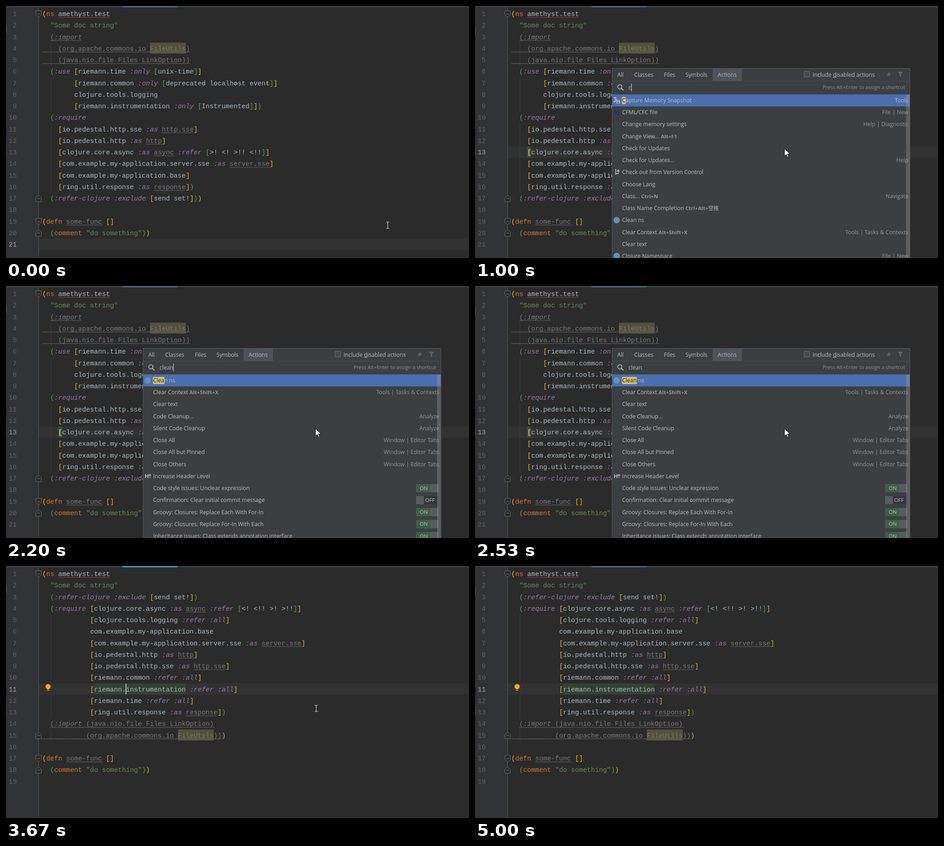
Animation, 1015 px wide and 552 px high, one loop 5.07 s. Source, as an HTML page:

```html
<!DOCTYPE html>
<html lang="en">
<head>
<meta charset="utf-8">
<title>Clean namespace</title>
<style>
html, body { margin: 0; width: 100%; height: 100%; overflow: hidden; background: #2b2b2b; }
svg { display: block; }
.code text { font: 14.564px "Liberation Mono", monospace; }
.code .kw { font-style: italic; }
.code .bold { font-weight: bold; }
.ui text { font: 12.2px "Open Sans", "Noto Sans CJK SC", sans-serif; fill: #bbb; }
.ui .key { font-size: 11.4px; font-weight: bold; fill: #929496; }
.ui .dim { fill: #929496; }
.ui .hint { font-size: 11px; fill: #8c8e90; }
.ui .small { font-size: 11.5px; }
.ui .strong { font-weight: bold; }
.ui .hit { fill: #262626; }
</style>
</head>
<body>
<svg id="stage" width="1015" height="552" viewBox="0 0 1015 552"></svg>
<script>
const LOOP = 5070, X0 = 79.5, CW = 8.74, LH = 25.26;
const GREY = '#76777c', YELLOW = '#e8ba36', GREEN = '#54a857';
const stage = document.getElementById('stage');
const $ = id => document.getElementById(id);
const esc = s => s.replace(/&/g, '&amp;').replace(/</g, '&lt;').replace(/>/g, '&gt;');
const colX = c => X0 + c * CW;
const rowY = i => 4.6 + LH * i;
const baseY = i => 22 + LH * i;
const rect = (x, y, w, h, fill, more = '') =>
  `<rect x="${x}" y="${y}" width="${w}" height="${h}" fill="${fill}" ${more}/>`;
const text = (x, y, s, more = '') => `<text x="${x}" y="${y}" ${more}>${s}</text>`;
const line = (d, stroke, more = '') => `<path d="${d}" fill="none" stroke="${stroke}" ${more}/>`;

const before = `(ns amethyst.test
  "Some doc string"
  (:import
    (org.apache.commons.io FileUtils)
    (java.nio.file Files LinkOption))
  (:use [riemann.time :only [unix-time]]
        [riemann.common :only [deprecated localhost event]]
        clojure.tools.logging
        [riemann.instrumentation :only [Instrumented]])
  (:require
    [io.pedestal.http.sse :as http.sse]
    [io.pedestal.http :as http]
    [clojure.core.async :as async :refer [>! <! >!! <!!]]
    [com.example.my-application.server.sse :as server.sse]
    [com.example.my-application.base]
    [ring.util.response :as response])
  (:refer-clojure :exclude [send set!]))

(defn some-func []
  (comment "do something"))
`;
const after = `(ns amethyst.test
  "Some doc string"
  (:refer-clojure :exclude [send set!])
  (:require [clojure.core.async :as async :refer [<! <!! >! >!!]]
            [clojure.tools.logging :refer :all]
            com.example.my-application.base
            [com.example.my-application.server.sse :as server.sse]
            [io.pedestal.http :as http]
            [io.pedestal.http.sse :as http.sse]
            [riemann.common :refer :all]
            [riemann.instrumentation :refer :all]
            [riemann.time :refer :all]
            [ring.util.response :as response])
  (:import (java.nio.file Files LinkOption)
           (org.apache.commons.io FileUtils)))

(defn some-func []
  (comment "do something"))
`;

function wave(c1, c2, row, color) {
  const n = Math.round((c2 - c1) * CW / 4);
  return line(`M${colX(c1)} ${baseY(row) + 4}` + 'l2 -2l2 2'.repeat(n), color, 'stroke-width=".9"');
}

// Colours one file; with inspect off the checks (unused, aliases) are not shown yet.
function code(src, inspect) {
  const depth = { '(': 0, '[': 0 };
  let out = '', unused = 0, prev = '';
  src.split('\n').forEach((s, row) => {
    let from = unused ? 0 : -1, to = 0;
    for (const m of s.matchAll(/"[^"]*"|:[\w-]+|[()[\]]|[^\s()[\]":]+/g)) {
      const w = m[0], c = m.index;
      let fill = '#a9b7c6', cls = '';
      if (w === '(' && s.startsWith(':import', c + 1)) {
        unused = depth['('] + 1;
        from = c;
      }
      const inside = unused;
      if (w === '(' || w === '[') fill = ++depth[w] % 2 ? YELLOW : GREEN;
      else if (w === ')' || w === ']') {
        const open = w === ')' ? '(' : '[';
        fill = depth[open]-- % 2 ? YELLOW : GREEN;
        if (unused && depth['('] < unused) unused = 0;
      }
      else if (w[0] === '"') fill = '#6a8759';
      else if (w[0] === ':') { fill = '#9876aa'; cls = 'kw'; }
      else if (/^(ns|defn|comment)$/.test(w)) fill = '#cc7832';
      else if (w === 'amethyst.test') out += wave(c, c + w.length, row, '#bc3f3c');
      else if (inspect && (w === 'some-func' || prev === ':as')) {
        fill = GREY;
        out += wave(c, c + w.length, row, GREY);
      }
      if (inside && inspect) {
        fill = GREY;
        to = c + w.length;
        if (w === 'FileUtils') out += rect(colX(c), rowY(row), 9 * CW, 24, '#52503a');
      }
      out += text(colX(c), baseY(row), esc(w), `fill="${fill}" class="${cls}"`);
      prev = w;
    }
    if (from >= 0 && inspect) out += wave(from, to, row, GREY);
  });
  return out;
}

const guide = (a, b) => line(`M98.5 ${rowY(a)}V${rowY(b + 1)}`, '#393b3c');
function fold(row, up) {
  const y = rowY(row) + 13, k = up ? -1 : 1;
  return `<path d="M65.5 ${y - 7 * k}h12v${9 * k}l-6 ${5 * k}l-6 ${-5 * k}z" fill="#2b2b2b" stroke="#66686a"/>` +
    line(`M68.5 ${y}h6`, '#7a7c7e');
}
const numbers = (n, id) => Array.from({ length: n }, (_, i) =>
  text(23.5, baseY(i), i + 1, `id="${id}${i + 1}" text-anchor="end" fill="#606366"`)).join('');

// name; shortcut; right side; icon
const lists = {
  c: `Capture Memory Snapshot;;Tools;mem
CFML/CFC file;;File | New;box
Change memory settings;;Help | Diagnostic
Change View...;Alt+F1
Check for Updates
Check for Updates...;;Help
Check out from Version Control;;;vcs
Choose Lang
Class...;Ctrl+N;Navigate
Class Name Completion;Ctrl+Alt+空格
Clean ns;;;dot
Clear Context;Alt+Shift+X;Tools | Tasks & Contexts
Clear text
Clojure Namespace;;File | New;dot`,
  cl: `Class...;Ctrl+N;Navigate
Class Name Completion;Ctrl+Alt+空格
Clean ns;;;dot
Clear Context;Alt+Shift+X;Tools | Tasks & Contexts
Clear text
Clojure Namespace;;File | New;dot
Close All;;Window | Editor Tabs
Close All but Pinned;;Window | Editor Tabs
Close Others;;Window | Editor Tabs
Code Cleanup...;;Analyze
Silent Code Cleanup;;Analyze
Increase Header Level;;;head
Code style issues: Unclear expression;;ON
Confirmation: Clear initial commit message;;OFF`,
  cle: `Clean ns;;;dot
Clear Context;Alt+Shift+X;Tools | Tasks & Contexts
Clear text
Code Cleanup...;;Analyze
Silent Code Cleanup;;Analyze
Close All;;Window | Editor Tabs
Close All but Pinned;;Window | Editor Tabs
Close Others;;Window | Editor Tabs
Increase Header Level;;;head
Code style issues: Unclear expression;;ON
Confirmation: Clear initial commit message;;OFF
Groovy: Closures: Replace Each With For-In;;ON
Groovy: Closures: Replace For-In With Each;;ON
Inheritance issues: Class extends annotation interface;;ON`
};

const icons = {
  mem: y => rect(304, y - 7, 6, 3, '#afb1b3') + rect(306, y - 3, 6, 3, '#afb1b3') +
    rect(304, y + 1, 5, 3, '#afb1b3') + rect(310, y, 8, 7, '#afb1b3') + rect(312, y + 3, 4, 3, '#4b6eaf'),
  box: y => rect(305, y - 6, 12, 12, '#23395c'),
  dot: y => `<circle cx="310.5" cy="${y}" r="7" fill="#6391b8"/>`,
  vcs: y => line(`M308.5 ${y + 6}V${y - 7}M308.5 ${y + 3}H314V${y - 4}M311 ${y - 2}l3 -3l3 3`, '#afb1b3', 'stroke-width="1.8"'),
  head: y => text(304, y + 4, 'H', 'class="strong"') +
    line(`M315.5 ${y + 4}v-8M313 ${y - 1}l2.5 -3l2.5 3`, '#bbb', 'stroke-width="1.3"')
};

function toggle(y, on) {
  return on
    ? rect(899, y - 9, 49, 18, '#3f5f49') + rect(930, y - 9, 18, 18, '#585b5d') + text(907, y + 4, 'ON', 'class="small"')
    : rect(899, y - 9, 49, 18, '#35383a') + rect(899, y - 9, 17, 18, '#5a5d5f') + text(919, y + 4, 'OFF', 'class="small"');
}

function listRows(key, n) {
  return lists[key].split('\n').map((s, i) => {
    const [name, keys, right, icon] = s.split(';');
    const y = 206.7 + 26.23 * i;
    let out = icon ? icons[icon](y) : '';
    const label = i ? name : `<tspan class="hit">${name.slice(0, n)}</tspan>${name.slice(n)}`;
    out += text(322.5, y + 4.3, label + (keys ? ` <tspan class="key">${keys}</tspan>` : ''), i ? '' : 'id="first"');
    if (right === 'ON' || right === 'OFF') out += toggle(y, right === 'ON');
    else if (right) out += text(950, y + 4.3, esc(right), `class="${i ? 'dim' : ''}" text-anchor="end"`);
    return out;
  }).join('');
}

const tabs = [['All', 312], ['Classes', 349], ['Files', 414], ['Symbols', 461.5], ['Actions', 532]];
const popup = rect(300.5, 136.5, 653, 430, '#3c3f41', 'stroke="#555759"') +
  rect(521, 137, 64, 27, '#4d5358') +
  tabs.map(([s, x]) => text(x, 154.5, s)).join('') +
  rect(721.5, 143.5, 12, 12, '#43494a', 'stroke="#6b6b6b"') +
  text(740, 154.5, 'Include <tspan text-decoration="underline">d</tspan>isabled actions') +
  '<path d="M906 144l6 5l-2 1l-2 4l-2-2l-5 4l4-5l-2-2l4-2z M927 144h11l-4 5v7l-3-2v-5z" fill="#606365"/>' +
  line('M301 164.5H953M301 193.5H953', '#4b4e50') +
  '<circle cx="317.5" cy="177" r="4.6" fill="none" stroke="#afb1b3" stroke-width="1.8"/>' +
  line('M321 180.5l4.5 4.5', '#afb1b3', 'stroke-width="2.2"') +
  text(336.5, 182.5, '', 'id="query"') + rect(342, 170, 1.2, 17, '#ccc', 'id="queryCaret"') +
  text(943, 182, 'Press Alt+Enter to assign a shortcut', 'class="hint" text-anchor="end"') +
  rect(301, 194, 652, 26, '#4b6eaf') +
  rect(322, 199, 9, 16, '#d3bd70', 'id="match" rx="2"') +
  '<g id="rows"></g>' + rect(945, 194, 8, 358, '#a6a6a6', 'opacity=".3"');

const brackets = [4, 56].map((c, i) => rect(colX(c), rowY(12) + 1, CW, 23, '#3b514d') +
  text(colX(c), baseY(12), '[]'[i], `class="bold" fill="${YELLOW}"`)).join('');

stage.innerHTML = rect(0, 0, 1015, 552, '#2b2b2b') + rect(0, 0, 72, 552, '#313335') +
  rect(0, 0, 1.5, 552, '#2b2b2b') + rect(0, 44, 1.5, 19, '#52503a') + rect(0, 268, 1.5, 20, '#0d293e') +
  rect(0, 306, 1.5, 22, '#45423a') +
  rect(72, 0, 943, 25.2, '#323232', 'id="row"') + line('M71.5 0V552', '#555') +
  rect(0, 0, 1015, 3, '#3c3f41') + rect(255, 0, 121, 3, '#3a9ab8', 'id="tab"') +
  '<g class="code">' +
  `<g id="doc0">${guide(3, 4) + guide(6, 8) + guide(10, 15) + fold(0) + fold(16, 1) + fold(18) + fold(19, 1) +
    numbers(21, 'a') + code(before, true)}<g id="brackets">${brackets}</g></g>` +
  `<g id="newBase">${guide(4, 12) + guide(14, 14) + fold(0) + fold(14, 1) + fold(16) + fold(17, 1) + numbers(19, 'b')}</g>` +
  `<g id="doc1">${code(after, false)}</g>` +
  `<g id="doc2">${rect(colX(13), rowY(10), 23 * CW, 24, '#344134') + code(after, true)}</g></g>` +
  '<g id="bulb"><circle cx="92.3" cy="264" r="5.6" fill="#f0a732"/>' +
  rect(89.5, 267, 5.5, 3, '#f0a732') + rect(89.8, 271, 5, 2, '#9a9da0') + '</g>' +
  rect(0, 0, 1.6, 23, '#ddd', 'id="caret"') +
  `<g id="popup" class="ui">${popup}</g>` +
  '<path id="arrow" d="M0 0V16L3.7 12.5L6.5 18.5L9 17.4L6.3 11.6H11.5Z" fill="#fff" stroke="#111" stroke-width=".9" transform="translate(678.5 312.5)"/>' +
  '<path id="beam" d="M-3.5 -7h2.5l1 1l1 -1h2.5M0 -6V6M-3.5 7h2.5l1 -1l1 1h2.5" fill="none" stroke="#d0d0d0" stroke-width="1.2"/>';
$('b11').setAttribute('fill', '#a4a3a3');

// time, x, y of the text pointer
const path = [[0, 837, 480], [70, 837, 480], [250, 680, 313], [3690, 680, 312], [3800, 702, 365],
  [3900, 685, 425], [4010, 470, 440], [4130, 250, 438], [4200, 225, 470], [4270, 200, 510], [4400, 180, 533]];
function pointer(t) {
  let i = 1;
  while (i < path.length - 1 && path[i][0] < t) i++;
  const [a, b] = [path[i - 1], path[i]];
  const k = Math.min(1, (t - a[0]) / (b[0] - a[0]));
  return [1, 2].map(j => a[j] + (b[j] - a[j]) * k);
}

const typed = [[0, 'c'], [1870, 'cl'], [2000, 'cle'], [2070, 'clea'], [2200, 'clean']];
const show = (id, on) => $(id).style.display = on ? '' : 'none';
const within = (t, ...spans) => spans.some(([a, b]) => t >= a && t < b);
let shown = '';

function drawPopup(t) {
  const query = typed.filter(e => e[0] <= t).pop()[1];
  const n = t < 2330 ? Math.min(4, query.length) : 5;
  const key = query + n;
  if (key !== shown) {
    shown = key;
    $('query').textContent = query;
    $('rows').innerHTML = listRows(query.slice(0, 3), n);
    $('match').setAttribute('width', $('first').getSubStringLength(0, n) + 1);
    $('queryCaret').setAttribute('x', 336.5 + $('query').getComputedTextLength());
  }
  show('queryCaret', !within(t, [1470, 1670], [2470, 2800]));
}

function draw(t) {
  const fresh = t >= 2930, clicked = t >= 270;
  const row = fresh ? 10 : clicked ? 12 : 20;
  const open = within(t, [1000, 2800]);
  show('doc0', !fresh);
  show('newBase', fresh);
  show('doc1', fresh && t < 3200);
  show('doc2', t >= 3200);
  show('brackets', clicked);
  show('bulb', t >= 3670);
  $('row').setAttribute('y', rowY(row));
  $('a13').setAttribute('fill', clicked ? '#a4a3a3' : '#606366');
  $('a21').setAttribute('fill', clicked ? '#606366' : '#a4a3a3');
  $('tab').setAttribute('fill', within(t, [0, 70], [1000, 2870], [4930, LOOP]) ? '#3f6e7b' : '#3a9ab8');

  show('caret', within(t, [270, 1000], [2930, 3200], [3670, 4150], [4400, 4930]));
  $('caret').setAttribute('x', colX(fresh ? 21 : 57) - .8);
  $('caret').setAttribute('y', rowY(row) + .8);

  show('popup', open);
  if (open) drawPopup(t);

  const arrow = within(t, [930, 2800]);
  show('arrow', arrow);
  show('beam', !arrow && t < 4400);
  $('beam').setAttribute('transform', `translate(${pointer(t).join(' ')})`);
}

const start = performance.now();
function tick() {
  draw((performance.now() - start) % LOOP);
  requestAnimationFrame(tick);
}
tick();
</script>
</body>
</html>
```
